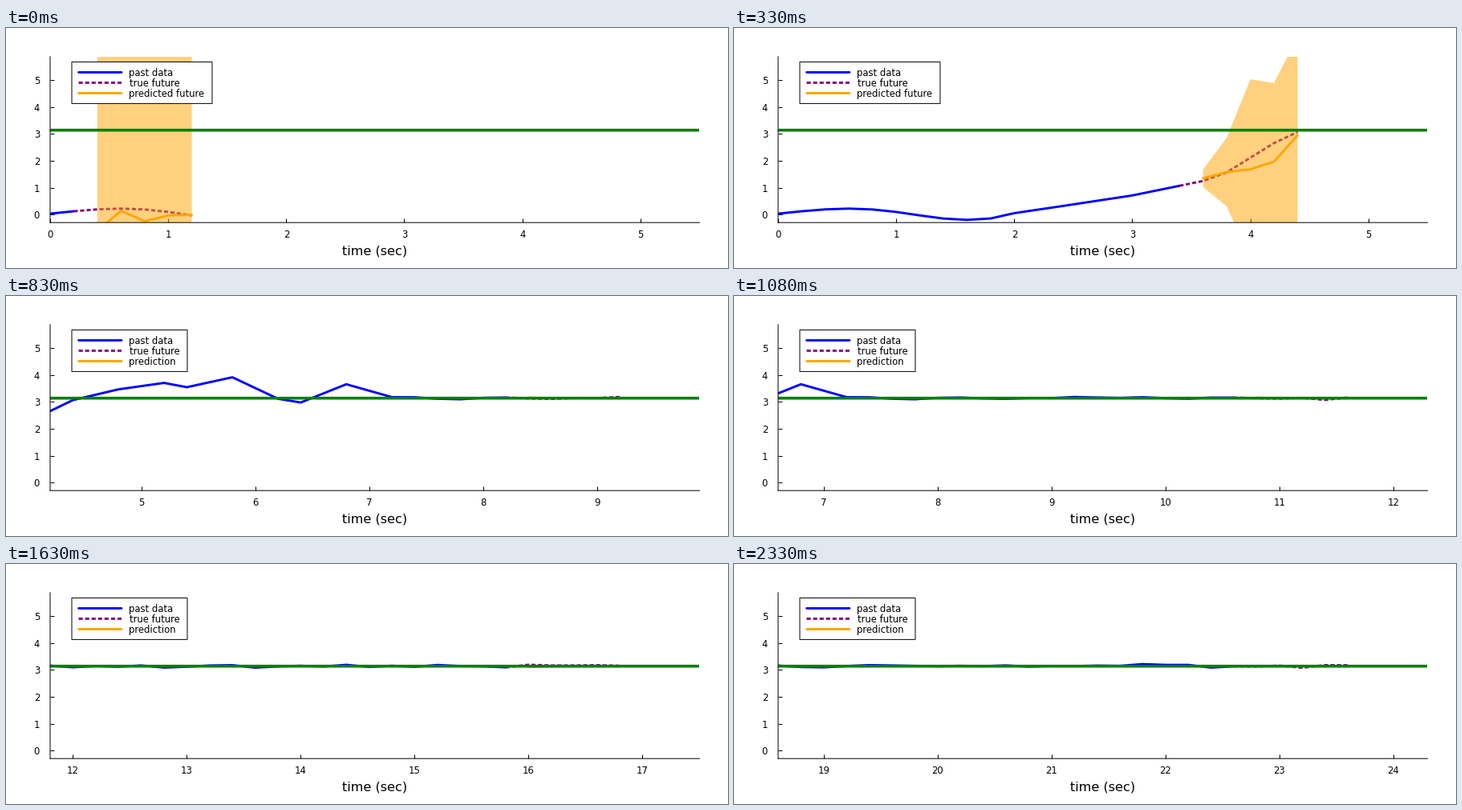
Animation of 900 by 300 pixels, one loop 2.37 s. Source, as a matplotlib script:

```python
import numpy as np
import matplotlib.pyplot as plt
from matplotlib.animation import FuncAnimation

W, H, DPI = 900, 300, 100
TICK_MS, TICKS = 10, 237
PX = 72 / DPI  # points per pixel
LEFT, RIGHT, TOP, BOTTOM = 55, 864.4, 35.8, 243.2
SMALL, LARGE = 8.42, 11.6
DT, SAMPLES = 0.2, 119
AHEAD = np.arange(1, 6)

plt.rcParams["font.family"] = "DejaVu Sans"
plt.rcParams["path.snap"] = False


def pendulum(t):
    """Small swing, climb with overshoot, then jitter around upright."""
    sway = 0.01 + 0.21 * np.cos(0.43 * t**2 + 2.19 * t - 1.47)
    climb = np.interp(t, *zip((2.0, 0.05), (2.4, 0.31), (3.0, 0.71), (3.6, 1.25),
                              (3.8, 1.57), (4.2, 2.66), (4.4, 3.07), (4.8, 3.47),
                              (5.2, 3.71), (5.4, 3.55), (5.8, 3.92), (6.2, 3.12),
                              (6.4, 2.98), (6.8, 3.66), (7.2, 3.18)))
    jitter = np.random.default_rng(3).normal(0.005, 0.028, len(t))
    return np.where(t < 1.9, sway, np.where(t < 7.3, climb, np.pi + jitter))


time = np.round(DT * np.arange(SAMPLES), 1)
theta = pendulum(time)

# Forecast miss at the start and before the climb, and its spread there
miss_start = np.array([-0.81, -0.08, -0.44, -0.13, 0.02])
miss_climb = np.array([0.10, 0.01, -0.43, -0.69, -0.12])
spread = np.array([0.33, 1.28, 3.35, 2.93, 3.67])
CLIMB = 8


def forecast(step, n):
    """Mean and half-width: a wild guess at first, later a decay to upright."""
    miss = miss_start + (miss_climb - miss_start) * min(step / CLIMB, 1)
    wild = theta[n - 1 + AHEAD] + miss
    wild_half = spread * 24 ** (1 - step / CLIMB)

    offset = theta[n - 1] - np.pi
    calm = np.pi + 1.6 * offset * 0.4**AHEAD
    calm_half = 0.32 * abs(offset) * AHEAD * 0.5**AHEAD

    skill = np.clip((step - CLIMB) / 5, 0, 1)
    return (wild + (calm - wild) * skill,
            wild_half + (calm_half - wild_half) * skill)


fig = plt.figure(figsize=(W / DPI, H / DPI), dpi=DPI, facecolor="white")
ax = fig.add_axes([LEFT / W, 1 - BOTTOM / H, (RIGHT - LEFT) / W, (BOTTOM - TOP) / H])
ax.patch.set_visible(False)
ax.set_ylim(-0.3, 5.88)
ax.set_yticks(range(6))
for side, spine in ax.spines.items():
    spine.set_visible(side in ("left", "bottom"))
    spine.set_linewidth(PX)
ax.tick_params(direction="in", length=5 * PX, width=PX, labelsize=SMALL)
ax.tick_params(axis="x", pad=8.4 * PX)
ax.tick_params(axis="y", pad=13 * PX)

solid = dict(lw=2.9 * PX, solid_capstyle="round", solid_joinstyle="round")
dotted = dict(lw=2.9 * PX, ls=(0, (1.75, 1.03)), dash_capstyle="butt")

past, = ax.plot([], [], color="blue", zorder=2.0, **solid)
future, = ax.plot([], [], color="purple", zorder=2.1, **dotted)
ribbon, = ax.fill([0, 1, 1], [0, 0, 1], color="orange", alpha=0.5, lw=0, zorder=2.2)
predicted, = ax.plot([], [], color="orange", zorder=2.3, **solid)
ax.axhline(np.pi, color="green", lw=3.6 * PX, zorder=2.4)

# Pixel-space layer for the axis title and the legend
top = fig.add_axes([0, 0, 1, 1], zorder=5)
top.set(xlim=(0, W), ylim=(H, 0))
top.axis("off")
top.text(460, 284, "time (sec)", fontsize=LARGE, ha="center", va="baseline")
box = plt.Rectangle((82, 42.4), 175, 52, fc="white", ec="black", lw=PX)
top.add_patch(box)
labels = []
for row, (name, color, style, x) in enumerate([("past data", "blue", solid, 153),
                                               ("true future", "purple", dotted, 154),
                                               ("predicted future", "orange", solid, 153)]):
    y = 55.4 + 13 * row
    top.plot([90.6, 144], [y, y], color=color, **style)
    labels.append(top.text(x, y + 4.4, name, fontsize=SMALL, va="baseline"))


def draw(tick):
    step = ((2 * tick + 1) * 12 - 1) // 100  # 24 steps per second
    n = 2 + 2 * step
    now = time[n - 1]
    ahead = time[n - 1 + AHEAD]

    past.set_data(time[:n], theta[:n])
    future.set_data(time[n - 1:n + 5], theta[n - 1:n + 5])
    mean, half = forecast(step, n)
    predicted.set_data(ahead, mean)
    ribbon.set_xy(np.column_stack([np.r_[ahead, ahead[::-1]],
                                   np.r_[mean + half, (mean - half)[::-1]]]))

    lo = round(max(0, now - 4), 1)
    hi = round(max(5.5, now + 1.7), 1)
    ax.set_xticks(np.arange(np.ceil(lo), np.floor(hi) + 1))
    ax.set_xlim(lo, hi)

    scrolling = lo > 0
    labels[2].set_text("prediction" if scrolling else "predicted future")
    box.set_width(144 if scrolling else 175)
    return past, future, ribbon, predicted


anim = FuncAnimation(fig, draw, frames=TICKS, interval=TICK_MS, repeat=True,
                     repeat_delay=0, blit=False)
plt.show()
```
